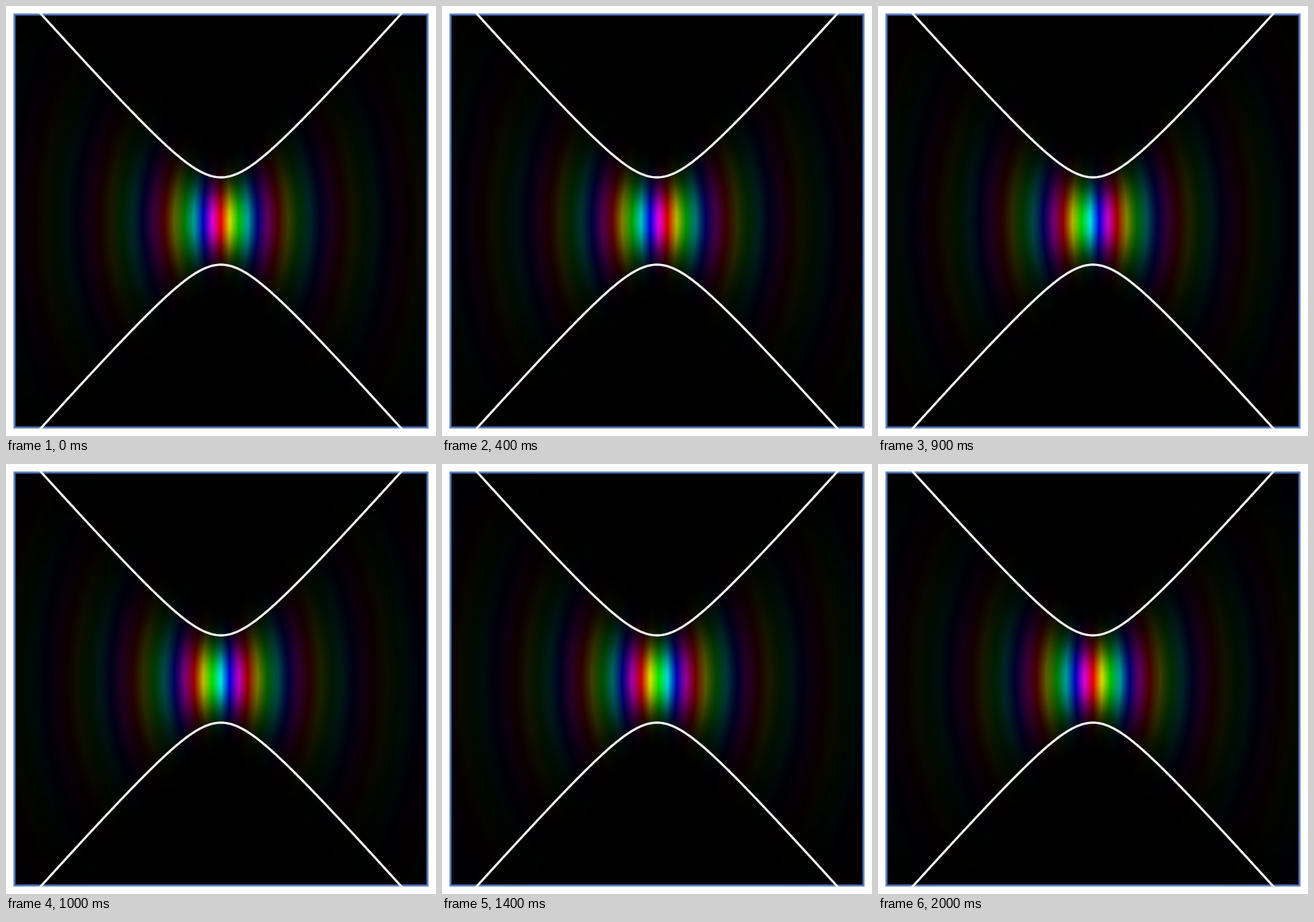
Write an HTML page with a canvas that moves like this. It is 640 px wide and 640 px high and loops after 2.1 s.

```html
<!DOCTYPE html>
<html>
<head>
<meta charset="utf-8">
<style>
html, body { margin: 0; width: 100%; height: 100%; overflow: hidden; background: #fff; }
canvas { display: block; width: 640px; height: 640px; }
</style>
</head>
<body>
<canvas id="stage" width="640" height="640"></canvas>
<script>
const ctx = document.getElementById('stage').getContext('2d');
const MID = 320, LO = 12, HI = 628, SIZE = HI - LO;
const W0 = 65, ZR = 57.8, K = 0.0625; // waist, Rayleigh range, wave number
const STEP = 100, STEPS = 21, PEAK = 228, HUES = 720;

const beamWidth = z => W0 * Math.sqrt(1 + (z / ZR) ** 2);

// Hue wheel, one RGB triple per entry
const wheel = new Float32Array(HUES * 3);
for (let i = 0; i < HUES; i++) {
  [5, 3, 1].forEach((n, c) => {
    const k = (n + i * 6 / HUES) % 6;
    wheel[i * 3 + c] = 1 - Math.max(0, Math.min(k, 4 - k, 1));
  });
}

// Phase (in wheel entries) and brightness of the beam at each pixel
const phase = new Float32Array(SIZE * SIZE);
const light = new Float32Array(SIZE * SIZE);
for (let y = 0, i = 0; y < SIZE; y++) {
  for (let x = 0; x < SIZE; x++, i++) {
    const z = x + LO + 0.5 - MID, r = y + LO + 0.5 - MID;
    const w = beamWidth(z), q = (r / w) ** 2;
    const phi = K * z + Math.atan(z / ZR) + q * z / ZR;
    phase[i] = (phi / (2 * Math.PI)) * HUES;
    light[i] = PEAK * (W0 / w) ** 2 * Math.exp(-2 * q);
  }
}

const img = ctx.createImageData(SIZE, SIZE);
const px = img.data;

function drawField(turn) {
  const shift = turn * HUES;
  for (let i = 0, p = 0; i < phase.length; i++, p += 4) {
    let h = Math.floor(phase[i] - shift) % HUES;
    if (h < 0) h += HUES;
    const v = light[i];
    px[p] = v * wheel[h * 3];
    px[p + 1] = v * wheel[h * 3 + 1];
    px[p + 2] = v * wheel[h * 3 + 2];
    px[p + 3] = 255;
  }
  ctx.putImageData(img, LO, LO);
}

function drawBox(a, b, width, color) {
  ctx.strokeStyle = color;
  ctx.lineWidth = width;
  ctx.strokeRect(a, a, b - a, b - a);
}

function drawEdge(side) {
  ctx.beginPath();
  for (let x = 40; x <= 600; x += 2) ctx.lineTo(x, MID + side * beamWidth(x - MID));
  ctx.stroke();
}

function draw(n) {
  ctx.fillStyle = '#fff';
  ctx.fillRect(0, 0, 640, 640);
  drawField((n % 20) / 20);
  drawBox(14, 626, 2, '#162c5c');
  drawBox(12.3, 627.7, 2.4, '#6888c0');
  ctx.save();
  ctx.beginPath();
  ctx.rect(11, 11, 618, 618);
  ctx.clip();
  ctx.strokeStyle = '#f0f0ec';
  ctx.lineWidth = 3.4;
  ctx.lineJoin = 'round';
  drawEdge(-1);
  drawEdge(1);
  ctx.restore();
}

let start = null, last = -1;
function tick(now) {
  if (start === null) start = now;
  const n = Math.floor(Math.max(0, now - start) / STEP) % STEPS;
  if (n !== last) draw(last = n);
  requestAnimationFrame(tick);
}
draw(0);
requestAnimationFrame(tick);
</script>
</body>
</html>
```
